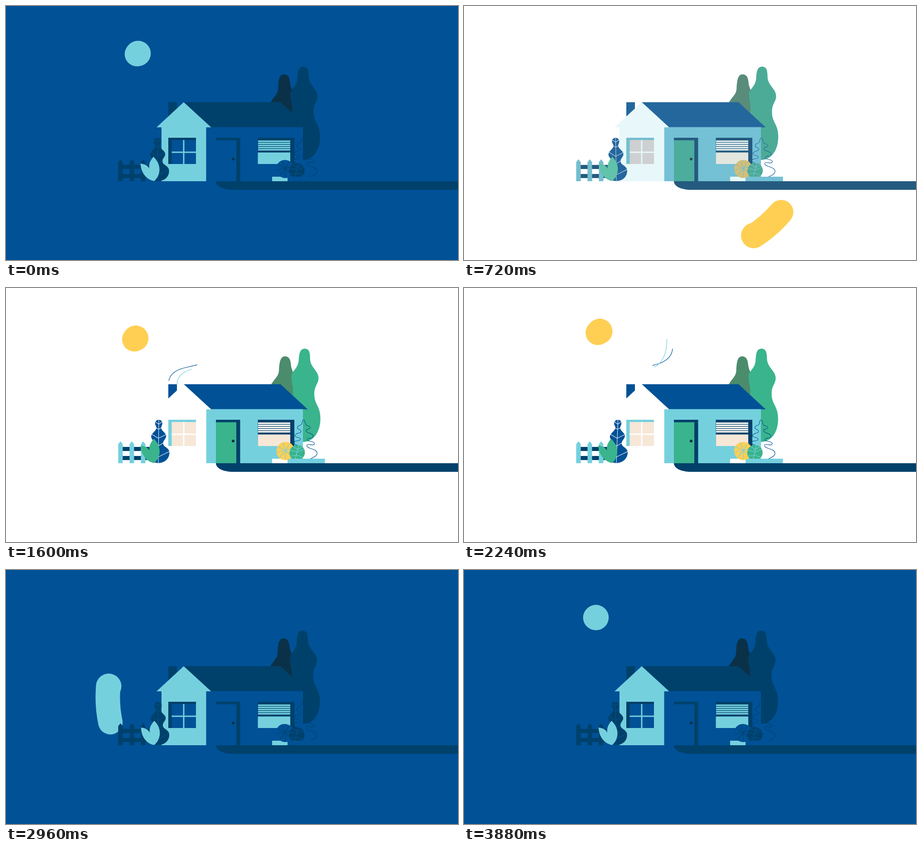
Write an HTML page that moves like this. It is 997 by 561 pixels and loops after 3920 ms.

```html
<!DOCTYPE html>
<html lang="en">
<head>
<meta charset="utf-8">
<title>House by day and night</title>
<style>
  html, body { margin: 0; width: 100%; height: 100%; overflow: hidden; }
  svg { display: block; }
</style>
</head>
<body>
<svg id="stage" width="997" height="561" viewBox="0 0 997 561"></svg>
<script>
const LOOP = 3920, HALF = 1925;
const BLUE = '#005196', NAVY = '#00416b', TEAL = '#75d0de', GREEN = '#3ab48c',
      YELLOW = '#ffcf54', INK = '#0b3148', CREAM = '#f7e7d7', WHITE = '#fff';

const dayColors = {
  roof: BLUE, gable: WHITE, wall: TEAL, trim: NAVY, road: NAVY, door: GREEN,
  frame: TEAL, pane: CREAM, mullion: WHITE, shade: CREAM, slat: '#fdf8f2', step: WHITE, planter: TEAL,
  tall: GREEN, short: '#4b8c6c', post: TEAL, rail: NAVY, plant: BLUE, plantVein: WHITE, leaf: GREEN,
  bushA: YELLOW, veinA: TEAL, bushB: GREEN, veinB: TEAL, wire: BLUE
};
const nightColors = {
  roof: NAVY, gable: TEAL, wall: BLUE, trim: NAVY, road: NAVY, door: BLUE,
  frame: NAVY, pane: BLUE, mullion: TEAL, shade: TEAL, slat: TEAL, step: TEAL, planter: BLUE,
  tall: NAVY, short: INK, post: NAVY, rail: NAVY, plant: NAVY, plantVein: BLUE, leaf: TEAL,
  bushA: BLUE, veinA: NAVY, bushB: NAVY, veinB: BLUE, wire: NAVY
};

const rect = (x1, y1, x2, y2, fill) =>
  `<rect x="${x1}" y="${y1}" width="${x2 - x1}" height="${y2 - y1}" fill="${fill}"/>`;
const shape = (d, fill) => `<path d="${d}" fill="${fill}"/>`;
const line = (d, stroke, width = 1) =>
  `<path d="${d}" fill="none" stroke="${stroke}" stroke-width="${width}"/>`;
const disc = (x, y, r, fill) => `<circle cx="${x}" cy="${y}" r="${r}" fill="${fill}"/>`;
const part = (name, body) => `<g class="${name}">${body}</g>`;

function scene(c) {
  const trees =
    part('short', shape('M614 151C623 151 626 158 627 167C628 185 640 190 645 250L577 250V232C583 203 601 200 601 181C602 160 605 151 614 151Z', c.short)) +
    part('tall', shape('M657 134C667 134 669 143 669 157C670 176 688 183 688 199C688 212 679 215 679 234C679 258 693 260 693 289C693 320 677 340 655 340C640 340 625 300 631 240C634 222 629 212 628 196C628 182 643 180 644 158C645 143 647 134 657 134Z', c.tall));

  const house =
    rect(358, 212.5, 377, 262, c.roof) +
    shape('M392 212.5H605.5L665.5 268H452Z', c.roof) +
    rect(441.5, 267.5, 655, 387, c.wall) +
    shape('M392 212.5L452.5 268H441.5V387H343V268H332Z', c.gable);

  const leftWindow =
    rect(358, 291, 419, 349, c.frame) + rect(365.5, 296, 419, 349, c.pane) +
    rect(390.5, 296, 393.5, 349, c.mullion) + rect(365.5, 321.5, 419, 324.5, c.mullion);

  const door = rect(463, 291, 516.5, 387, c.trim) + rect(463, 296.5, 508, 387, c.door) +
    disc(501, 338, 3.1, INK);

  const slats = [0, 1, 2, 3, 4].map(i =>
    rect(556, 297 + i * 4.7, 627, 300.4 + i * 4.7, c.slat)).join('');
  const rightWindow = rect(555.5, 291, 636, 349, c.trim) + slats +
    rect(555.5, 323.5, 627, 349, c.shade);

  const road = shape('M463 387H997V406H502C478 406 463 398 463 387Z', c.road);

  const wire = part('wire', line('M672 377C680 374 687 370 686 364C684 354 664 356 663 348C664 341 680 352 680 343C678 337 663 340 664 335C665 329 678 334 677 326C675 320 661 321 661 315C661 310 671 314 670 307C667 303 660 306 659 298C658 289 653 289 652 298C651 306 644 301 642 308C642 314 650 311 650 317C650 322 638 319 637 326C637 332 649 328 649 334C648 340 635 335 635 342C635 348 647 346 648 352', c.wire, 1.1));

  const bushes = part('bush',
    disc(616, 360, 20, c.bushA) +
    line('M596 363L634 354M609 341L617 359L624 345M600 351L617 359M604 374L617 359M616 378L617 359L630 372', c.veinA, 1.2) +
    shape('M631 377C621 370 623 347 642 347C660 347 664 369 652 377Z', c.bushB) +
    line('M638 377L645 348M625 358L643 362L657 356M628 371L641 369L655 374M633 350L643 357L652 351', c.veinB, 1.2));

  const posts = [247.5, 272.5, 297.5].map(x =>
    shape(`M${x} 387V345L${x + 5} 338.5L${x + 10} 345V387Z`, c.post)).join('');
  const fence = rect(257, 351, 330, 360, c.rail) + rect(257, 371, 330, 380, c.rail) + posts;

  const plant = part('plant',
    shape('M335 291C340 291 343 295 343 299C343 304 340 305 341 310C342 316 352 320 352 327C352 334 344 337 346 345C348 352 360 353 360 364C360 377 350 386.5 336 386.5C322 386.5 311 377 311 364C311 353 323 352 325 345C327 337 319 335 319 328C319 321 329 316 330 310C331 305 327 304 327 299C327 295 330 291 335 291Z', c.plant) +
    line('M335 291L336 386M328 296L335 301L342 296M329 309L335 312L341 309M320 323L335 332L351 324M325 342L335.500 349L346 342M312 362L336 373L360 361', c.plantVein));

  const leaves = part('leaf', shape('M327 386.5C342 374 345 350 327 333C318 343 316 351 317 359C313 352 307 349 298 348C298 368 310 384 327 386.5Z', c.leaf));

  return trees + house + leftWindow + door + rightWindow + road +
    rect(587, 377, 621, 387, c.step) + rect(621, 377, 703.5, 387, c.planter) +
    wire + bushes + fence + plant + leaves;
}

const smoke = (id, d, stroke) =>
  `<path id="${id}" d="${d}" pathLength="1" fill="none" stroke="${stroke}" stroke-width="1.2"/>`;

stage.innerHTML =
  `<rect id="sky" width="997" height="561"/>
   <path id="trail" fill="none" stroke-width="54" stroke-linecap="round"/><circle id="orb" r="28"/>
   <g id="day">${scene(dayColors)}
     ${smoke('smokeA', 'M358.500 213C358 190 375 181 395 176L424 169C448 162 459 150 460 134', BLUE)}
     ${smoke('smokeB', 'M377 213C377 196 390 185 408 180C438 171 448 145 447.500 112', TEAL)}
   </g>
   <g id="night">${scene(nightColors)}</g>`;

// Smooth monotone curve through [time, value] pairs.
function curve(keys) {
  const slope = i => (keys[i + 1][1] - keys[i][1]) / (keys[i + 1][0] - keys[i][0]);
  const tangent = i => {
    if (i === 0) return slope(0);
    if (i === keys.length - 1) return slope(i - 1);
    const a = slope(i - 1), b = slope(i);
    return a * b <= 0 ? 0 : 2 * a * b / (a + b);
  };
  return t => {
    let i = 0;
    while (i < keys.length - 2 && t > keys[i + 1][0]) i++;
    const [t0, v0] = keys[i], [t1, v1] = keys[i + 1], h = t1 - t0, u = (t - t0) / h;
    return v0 + (v1 - v0) * u * u * (3 - 2 * u) +
      h * u * (1 - u) * (tangent(i) * (1 - u) - tangent(i + 1) * u);
  };
}

const orbit = curve([[-100, 220.4], [0, 221], [315, 223.6], [400, 229], [480, 242], [560, 266],
  [600, 295], [640, 331], [675, 368.5], [720, 416.4], [760, 448], [800, 473], [875, 508],
  [960, 529.5], [1035, 545], [1120, 558], [1280, 571.5], [1435, 577.6], [1600, 579.3],
  [1925, 580.9], [2000, 581]]);
const treeTop = curve([[0, 655.7], [720, 657.6], [1600, 659], [2600, 654.6], [2960, 654], [3920, 655.7]]);
const plantTop = curve([[0, 333.7], [720, 334.4], [960, 335], [1600, 337], [2400, 339.8],
  [2600, 339.4], [2960, 335.5], [3400, 333.4], [3920, 333.7]]);
const leafTip = curve([[0, 325.2], [720, 327], [960, 328], [1600, 326], [2500, 324],
  [2960, 327], [3200, 327.6], [3920, 325.2]]);

const ramp = (t, a, b) => Math.min(1, Math.max(0, (t - a) / (b - a)));
const rgb = hex => [1, 3, 5].map(i => parseInt(hex.slice(i, i + 2), 16));
const mix = (a, b, k) => {
  const to = rgb(b);
  return `rgb(${rgb(a).map((v, i) => Math.round(v + (to[i] - v) * k))})`;
};

// Leans a part sideways by dx at height top, fixed at height base.
function lean(name, dx, top, base) {
  const k = dx / (base - top);
  for (const el of document.querySelectorAll('.' + name))
    el.setAttribute('transform', `matrix(1 0 ${-k} 1 ${k * base} 0)`);
}

function polar(degrees, radius) {
  const a = degrees * Math.PI / 180;
  return [494 + radius * Math.cos(a), 281 + radius * Math.sin(a)];
}

function trim(path, from, to) {
  path.style.visibility = to > from ? 'visible' : 'hidden';
  path.style.strokeDasharray = `${Math.max(0, to - from)} 2`;
  path.style.strokeDashoffset = -from;
}

function draw(t) {
  const daylight = ramp(t, 580, 750) - ramp(t, 2580, 2790);
  const skyLight = ramp(t, 600, 690) - ramp(t, 2620, 2720);
  day.setAttribute('opacity', daylight);
  night.setAttribute('opacity', 1 - daylight);
  sky.setAttribute('fill', mix(BLUE, '#ffffff', skyLight));

  const phase = t < HALF ? t : t - HALF;
  const head = orbit(phase), tail = Math.max(orbit(phase - 100), head - 17);
  const color = mix(TEAL, YELLOW, skyLight), [x, y] = polar(head, 268.5);
  trail.setAttribute('d', `M${polar(tail, 269.5)}A269.5 269.5 0 0 1 ${polar(head, 269.5)}`);
  trail.setAttribute('stroke', color);
  orb.setAttribute('cx', x);
  orb.setAttribute('cy', y);
  orb.setAttribute('fill', color);

  const sway = treeTop(t) - 657;
  lean('tall', sway, 134, 340);
  lean('short', sway * .7, 151, 300);
  lean('wire', sway * .5, 291, 377);
  lean('bush', sway * .4, 345, 380);
  lean('plant', plantTop(t) - 335, 291, 386);
  lean('leaf', leafTip(t) - 327, 333, 386);

  trim(smokeA, ramp(t, 1400, 2610) ** 1.6, ramp(t, 910, 2060));
  trim(smokeB, ramp(t, 1600, 2640) ** 1.6, ramp(t, 1200, 2250));
}

function tick() {
  draw(performance.now() % LOOP);
  requestAnimationFrame(tick);
}
tick();
</script>
</body>
</html>
```
